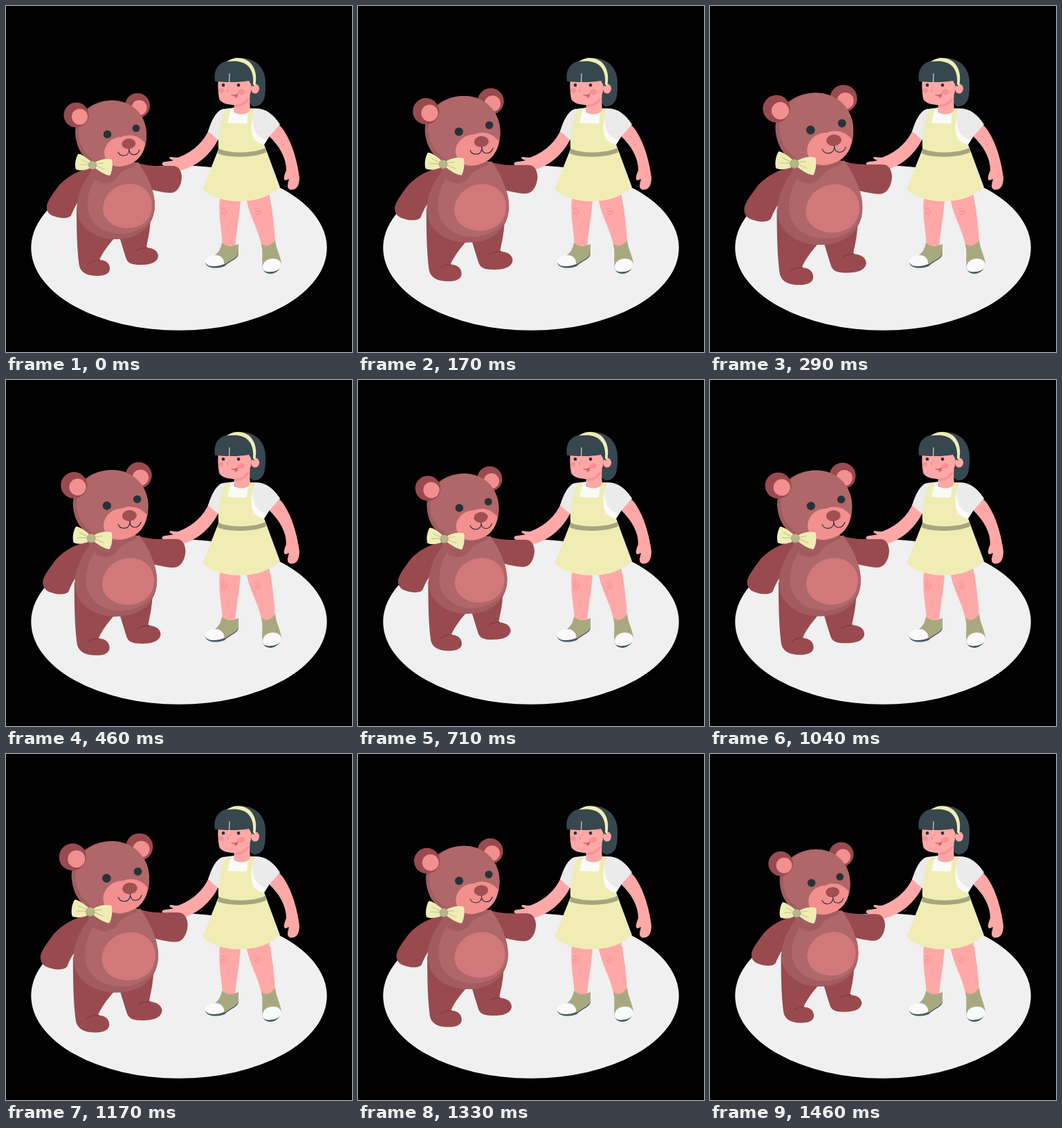
These frames come from a looping animation (500 px wide and 500 px high, 1500 ms). An HTML page with a canvas:

```html
<!DOCTYPE html>
<html lang="en">
<head>
<meta charset="utf-8">
<title>Girl and teddy bear</title>
<style>
  html, body { margin: 0; width: 100%; height: 100%; overflow: hidden; background: #000; }
  canvas { display: block; width: 100vmin; height: 100vmin; }
</style>
</head>
<body>
<canvas id="stage" width="500" height="500"></canvas>
<script>
const ctx = document.getElementById('stage').getContext('2d');
const LOOP = 1500, STEPS = 36;
const PIVOT = { x: 159, y: 252 };

const C = {
  floor: '#f0f0f0', fur: '#994a4e', furShade: '#a25c60', furLight: '#b06769',
  belly: '#d1787b', earPink: '#f28f8f', nose: '#a04f52', ink: '#263238',
  skin: '#ffa8a7', blush: '#f99190', curl: '#f58a89', hair: '#37474f',
  dress: '#efedb4', khaki: '#a7a57c', sock: '#a8a980', shirt: '#ebebeb', white: '#fafafa', sole: '#455a64'
};

// Heartbeat of the bear: [step, scale], smoothly joined and cyclic.
const BEAT = [[0, 1], [4, 1.057], [7.5, 1.096], [11, 1.057], [17, 1.01],
  [19.5, 1.002], [22, 1.01], [26, 1.066], [28.3, 1.091], [35.1, 0.989]];

function beatKey(i) {
  const n = BEAT.length, turn = Math.floor(i / n);
  const [step, scale] = BEAT[i - turn * n];
  return [step + turn * STEPS, scale];
}

function beatSlope(i) {
  const [x0, y0] = beatKey(i - 1), [x1, y1] = beatKey(i), [x2, y2] = beatKey(i + 1);
  const a = (y1 - y0) / (x1 - x0), b = (y2 - y1) / (x2 - x1);
  return a * b <= 0 ? 0 : (y2 - y0) / (x2 - x0);
}

function beatScale(step) {
  let i = 0;
  while (beatKey(i + 1)[0] <= step) i++;
  const [x0, y0] = beatKey(i), [x1, y1] = beatKey(i + 1);
  const w = x1 - x0, u = (step - x0) / w, v = 1 - u;
  return v * v * (1 + 2 * u) * y0 + u * u * (3 - 2 * u) * y1
    + w * u * v * (v * beatSlope(i) - u * beatSlope(i + 1));
}

function shape(color, d) {
  ctx.fillStyle = color;
  ctx.fill(new Path2D(d));
}

function line(color, width, d) {
  ctx.strokeStyle = color;
  ctx.lineWidth = width;
  ctx.stroke(new Path2D(d));
}

function oval(color, x, y, rx, ry = rx, turn = 0) {
  ctx.fillStyle = color;
  ctx.beginPath();
  ctx.ellipse(x, y, rx, ry, turn, 0, Math.PI * 2);
  ctx.fill();
}

function drawGirlLegs() {
  shape(C.skin, 'M309 278C306 305 313 330 313 350L331 350C333 325 338 300 339 278Z');
  shape(C.skin, 'M347 278C352 305 366 325 370 350L389 346C388 320 385 295 380 270Z');
  for (const x of [315, 364]) {
    line(C.curl, 1, `M${x - 4} 293C${x} 291 ${x + 4} 294 ${x + 4} 298C${x + 3} 303 ${x - 4} 302 ${x - 3} 298C${x - 2} 295 ${x + 1} 296 ${x + 1} 298`);
  }
  shape(C.sole, 'M288 371C290 380 306 380 316 376C324 368 336 366 336 357L318 368Z');
  shape(C.sock, 'M312 342C319 349 327 348 336 344L336 356C335 364 326 366 317 373L300 372L293 364C303 361 310 355 312 342Z');
  shape(C.white, 'M288 370C288 363 296 360 304 360C312 361 316 367 315 373C306 377 290 378 288 370Z');
  shape(C.sole, 'M371 375C368 391 396 392 398 371Z');
  shape(C.sock, 'M369 344C377 350 384 345 389 338C390 350 397 362 398 372L371 378C369 366 372 356 369 344Z');
  shape(C.white, 'M371 378C371 369 378 365 386 365C394 365 398 370 398 374C396 383 385 385 377 384C372 383 371 381 371 378Z');
}

function drawGirlBody() {
  shape(C.skin, 'M293 179C286 195 272 210 250 218.5C245 220 241 218 237 218C235 220 238 222 242 223C238 225 230 224 226.5 226C224 229 227 231 231 231L250 238C275 233 297 214 308 190Z');
  shape(C.skin, 'M394 171C408 184 420 215 424 248C424 260 420 266 411 265.5C405 263 407 258 409 250L404 252C400 251 402 245 405 237C405 220 396 203 379 187Z');
  shape(C.shirt, 'M313 149L329 147L357 148C375 147 385 155 396 171L381 188L372 202L310 200L307 194L292 181C297 166 303 152 313 149Z');
  shape(C.white, 'M323 149L351 149L349 171L320 170Z');
  shape(C.white, 'M357 163C356 180 364 190 376 194L372 202L352 200L351 160Z');
  shape(C.dress, 'M319 149L325 148L320 169L348 170C349 160 350 154 351 148L359 149C354 165 353 182 358 192C363 198 370 200 373 200L376 208L396 262C370 288 310 289 284 265L307 207C306 185 309 164 319 149Z');
  shape(C.khaki, 'M307 206C322 213.5 358 213.5 375 205L376 211.5C358 219.5 322 220 306 213Z');
}

function drawGirlHead() {
  shape(C.hair, 'M336 75C360 74 376 89 375 113C375 128 374 136 369 141C364 146 358 146 354 143L340 120Z');
  shape(C.skin, 'M330 138L353 124C352 132 352 142 353 150C349 158 335 158 329 153Z');
  shape(C.blush, 'M331 141L352 133C349 140 342 146 331 146Z');
  shape(C.skin, 'M307 100C306 112 306 124 308 134C311 141 322 143 331 143C342 142 350 135 354 124L355 98Z');
  oval(C.skin, 360, 119.5, 6, 7);
  oval(C.blush, 311, 122, 3.5, 3.5);
  oval(C.blush, 340, 124, 5, 4);
  shape(C.hair, 'M302 109C299 92 308 80 323 79C346 77 358 90 359 116L355 115L351 108C335 111 317 110 302 109Z');
  line(C.skin, 1.4, 'M323 98L322.5 110');
  shape(C.dress, 'M319 80.5C328 73 343 73 352 81C361 90 363 102 360 116L357 113C358 100 355 91 348 85C340 79 330 79 319 80.5Z');
  oval(C.ink, 314, 114.3, 2.3, 2.5);
  oval(C.ink, 336, 114.3, 2.3, 2.5);
  line(C.curl, 1.2, 'M323 116C320 120 318 123 322 123');
  shape('#e06b70', 'M329 129.5L335 127C335.5 131 334 133 331 132.5Z');
  line('#a9484c', 1, 'M326 128.5C329 130 333 129 335.5 126.5');
}

function drawBearBody() {
  shape(C.fur, 'M102 290C102 330 103 355 106 376C109 387 120 390 132 390C144 390 151 386 150 378C149 370 142 367 135 367C140 355 150 343 157 335Z');
  line('#833b40', 1.2, 'M120 372C124 368 129 367 136 367');
  shape(C.fur, 'M209 305C208 330 204 340 203 349C213 350 219 353 220 361C219 371 208 374 194 374C182 374 177 372 174 366C171 357 168 347 164 334Z');
  line('#833b40', 1.2, 'M189 353C193 350 197 349 204 349');
  shape(C.fur, 'M126 234C101 237 85 250 76 260C68 271 61 280 59 288C58 296 62 302 70 304C78 307 89 308 94 303C97 295 101 287 106 281L130 260Z');
  shape(C.fur, 'M182 224C205 233 222 231 240 231C250 230 254 239 254 248C253 262 246 270 238 270C225 270 210 265 200 263Z');
  shape(C.furShade, 'M125 237C108 258 101 280 103 297C106 322 132 338 160 337C192 337 215 318 215 288C215 268 206 247 191 226Z');
  shape(C.furLight, 'M136 240C121 258 117 275 118 292C121 316 142 329 166 329C194 328 215 312 215 287C214 268 206 247 191 226Z');
  shape(C.furShade, 'M122 236C126 258 150 262 161 247C165 240 174 236 188 230L180 220Z');
  shape(C.belly, 'M180 257C199 258 211 271 211 289C210 309 196 321 174 321C154 320 141 309 140 293C141 272 158 257 180 257Z');
}

function drawBearHead() {
  oval(C.fur, 190, 144, 18);
  oval(C.earPink, 192.5, 147, 11);
  shape(C.furShade, 'M152 136.5C182 136 203 158 203 186C203 213 190 228 165 232C130 236 102 222 100 183C100 158 122 137 152 136.5Z');
  shape(C.furLight, 'M152 136.5C182 136 203 158 203 186C203 213 190 228 165 232C130 233 106 213 105 182C105 159 121 139 152 136.5Z');
  oval(C.fur, 101.5, 157.5, 18);
  oval(C.earPink, 106.5, 160, 11.5);
  shape(C.earPink, 'M142 213C142 200 153 189 168 189C179 184 192 187 201 198C198 219 186 229 165 232C152 232 143 226 142 213Z');
  oval(C.nose, 177.3, 199, 10, 7.5, -0.1);
  line(C.ink, 1.1, 'M162 211C165 218 176 218.5 178 209C180 217 190 217 193 208');
  line(C.ink, 1.1, 'M178 209L177.7 206');
  oval(C.ink, 146.5, 185.5, 5.8);
  oval(C.ink, 188, 176.6, 5.4);
}

function drawBow() {
  shape(C.dress, 'M123 225C115 218 107 213 104 214C100 221 99 231 101 236C108 239 116 237 123 234Z');
  shape(C.dress, 'M127 227C136 221 147 220 153 222C155 230 153 241 150 245C142 244 134 238 127 233Z');
  line('#cac793', 1.2, 'M107 229L119 229.5M109 222L119 227M131 231L142 236M131 228L140 227');
  oval(C.khaki, 125, 230, 6, 6.2);
  oval('#b9b68a', 125, 229.5, 5, 5.2);
}

function draw(time) {
  // The picture advances in whole steps, 24 per second.
  const step = Math.floor((time % LOOP) / LOOP * STEPS + 0.1) % STEPS;
  const scale = beatScale(step);
  ctx.fillStyle = '#000';
  ctx.fillRect(0, 0, 500, 500);
  oval(C.floor, 250, 349.5, 213.7, 119.2);

  drawGirlLegs();
  drawGirlBody();
  drawGirlHead();

  ctx.save();
  ctx.translate(PIVOT.x, PIVOT.y);
  ctx.scale(scale, scale);
  ctx.translate(-PIVOT.x, -PIVOT.y);
  drawBearBody();
  drawBearHead();
  drawBow();
  ctx.restore();
}

ctx.lineCap = 'round';
const start = performance.now();
function tick() {
  draw(performance.now() - start);
  requestAnimationFrame(tick);
}
tick();
</script>
</body>
</html>
```
